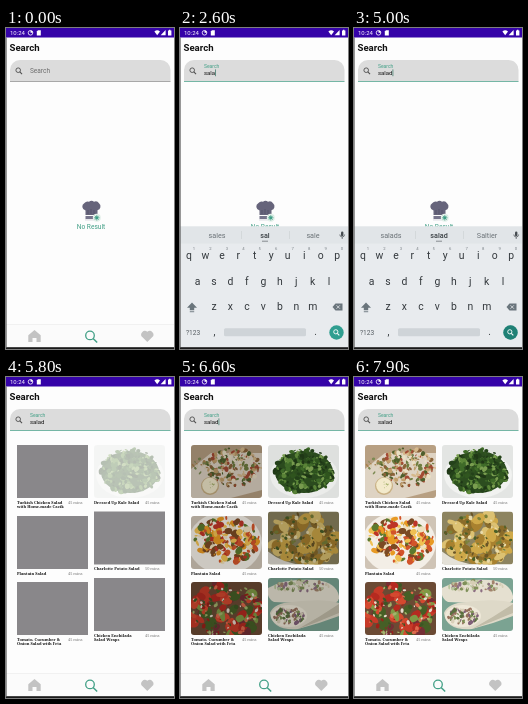
Write an HTML page that moves like this. It is 168 px wide and 321 px high and loops after 8 s.

```html
<!DOCTYPE html>
<html lang="en">
<head>
<meta charset="utf-8">
<title>Recipe search</title>
<style>
html,body{margin:0;width:100%;height:100%;overflow:hidden;background:#fdfdfd}
svg{display:block;width:100vw;height:100vh;font-family:Roboto,sans-serif}
.serif{font-family:"Noto Serif",serif}
</style>
</head>
<body>
<svg id="stage" viewBox="0 0 168 321" preserveAspectRatio="none"></svg>
<script>
const LOOP = 8000, GREEN = '#43a087';
const clamp = v => Math.max(0, Math.min(1, v));
const ramp = (t, a, b) => clamp((t - a) / (b - a));
const ease = v => v * v * (3 - 2 * v);
const mix = (a, b, v) => a + (b - a) * v;

const stage = document.getElementById('stage');
function el(parent, tag, attrs = {}, text) {
  const n = document.createElementNS('http://www.w3.org/2000/svg', tag);
  for (const k in attrs) n.setAttribute(k, attrs[k]);
  if (text !== undefined) n.textContent = text;
  parent.appendChild(n);
  return n;
}
const group = (p, a) => el(p, 'g', a);
const rect = (p, x, y, width, height, fill, a) => el(p, 'rect', {x, y, width, height, fill, ...a});
const circle = (p, cx, cy, r, fill, a) => el(p, 'circle', {cx, cy, r, fill, ...a});
const path = (p, d, fill, a) => el(p, 'path', {d, fill, ...a});
const label = (p, x, y, size, fill, s, a) => el(p, 'text', {x, y, 'font-size': size, fill, ...a}, s);
const mid = {'text-anchor': 'middle'};
const show = (n, on) => n.setAttribute('visibility', on ? 'visible' : 'hidden');
const fade = (n, v) => n.setAttribute('opacity', v);

function lens(p, x, y, r, color, w) {
  circle(p, x, y, r, 'none', {stroke: color, 'stroke-width': w});
  const k = r * .72;
  path(p, `M${x + k} ${y + k}l${r * .95} ${r * .95}`, 'none', {stroke: color, 'stroke-width': w * 1.15});
}

// page
rect(stage, 0, 0, 168, 321, '#fdfdfd');
const empty = group(stage);
path(empty, 'M79.5 187v-4.6a4 4 0 0 1-1-7.5a4 4 0 0 1 4.5-1.2a4 4 0 0 1 5 0a4 4 0 0 1 5 1.5a4 4 0 0 1-1.5 7v4.8z', '#66647b');
path(empty, 'M82 182v4M85 181v5M88 182v4', 'none', {stroke: '#4d4b62', 'stroke-width': .6});
rect(empty, 79.5, 188, 8, 3, '#77758c');
rect(empty, 79, 191.6, 9, .7, '#c5c5d0');
circle(empty, 90.8, 189.8, 4, '#e2f0e9');
circle(empty, 90.8, 189.8, 1.5, GREEN);
for (let i = 0; i < 4; i++)
  path(empty, 'M88 189.8h5.6', 'none', {stroke: GREEN, 'stroke-width': .7, transform: `rotate(${i * 45} 90.8 189.8)`});
label(empty, 85, 201, 6.6, GREEN, 'No Result', mid);

// photos drawn as loose flat shapes
let seed = 1;
const rnd = (a, b) => {
  seed = (seed * 16807) % 2147483647;
  return a + (b - a) * seed / 2147483647;
};
function bits(p, n, colors, cx, cy, rx, ry, lo, hi) {
  for (let i = 0; i < n; i++) {
    const a = rnd(0, 6.283), d = Math.sqrt(rnd(0, 1)), r = rnd(lo, hi);
    const x = cx + Math.cos(a) * d * rx, y = cy + Math.sin(a) * d * ry;
    el(p, 'ellipse', {cx: x, cy: y, rx: r, ry: r * rnd(.4, .9), fill: colors[i % colors.length],
      transform: `rotate(${rnd(0, 180)} ${x} ${y})`});
  }
}
const oval = (p, cx, cy, rx, ry, fill) => el(p, 'ellipse', {cx, cy, rx, ry, fill});
const paint = {
  chicken(p) {
    rect(p, 0, 0, 71, 53, '#b79f82');
    path(p, 'M0 24L20 8H71V45L40 53H0z', '#ded3c3');
    bits(p, 190, ['#8a6238', '#c2a06c', '#6f7d3f', '#e9dfc4', '#a34a33', '#4f5f2c', '#d6b98c'], 43, 22, 27, 19, 1, 3);
    bits(p, 14, ['#7c8a52', '#a9834f', '#d9cdb5'], 10, 20, 8, 8, 1, 2.5);
    circle(p, 19, 41, 9, '#c9b184');
    circle(p, 19, 40.6, 7.8, '#f3eacb');
    bits(p, 7, ['#a5b06b'], 19, 40, 4, 4, .5, 1.2);
  },
  kale(p) {
    rect(p, 0, 0, 71, 53, '#e3e5e3');
    oval(p, 36, 30, 34, 23, '#f1f2f0');
    oval(p, 36, 27, 29, 21, '#2c4d1f');
    bits(p, 260, ['#24421a', '#3f6b29', '#5b8638', '#30561f', '#7a9e50', '#1f3716'], 36, 26, 30, 22, 1, 3.2);
  },
  plantain(p) {
    rect(p, 0, 0, 71, 53, '#cfc4b6');
    oval(p, 34, 27, 37, 31, '#f3eee6');
    bits(p, 190, ['#e89a24', '#d2542a', '#f0c052', '#5d7a2e', '#bd3527', '#efe0bd', '#7b4a24'], 36, 24, 33, 23, 1.5, 4.2);
  },
  potato(p) {
    rect(p, 0, 0, 71, 53, '#8d8460');
    bits(p, 75, ['#a8812f', '#cfa949', '#8a6c2a', '#dcc172'], 36, 26, 34, 25, 4, 7.5);
    bits(p, 100, ['#4b5f28', '#7a8139', '#e9dbaa', '#6a5526'], 36, 26, 33, 25, .8, 2.2);
    path(p, 'M0 40Q16 53 36 53H0z', '#e4e1d8');
  },
  tomato(p) {
    rect(p, 0, 0, 71, 53, '#6b4a34');
    bits(p, 75, ['#b52a20', '#7f9a45', '#d4492f', '#465f26', '#742f35', '#c73a28'], 35, 27, 38, 28, 3.5, 7);
    bits(p, 100, ['#e6d9cb', '#3c5624', '#dd6a4c', '#9c2018', '#a3b36c'], 35, 27, 37, 27, .8, 2.6);
  },
  wraps(p) {
    rect(p, 0, 0, 71, 53, '#7ba392');
    path(p, 'M0 10Q16 0 48 2Q68 4 71 18Q72 26 60 26Q30 25 6 24Q-2 20 0 10z', '#e5e0d0');
    bits(p, 60, ['#7f9059', '#8d6f83', '#d6ceb5', '#a2836c', '#b9c59c'], 34, 8, 29, 5, 1, 2.6);
    path(p, 'M2 35Q6 25 24 24Q56 20 71 25V38Q50 46 30 51Q4 53 2 35z', '#ded9c8');
    path(p, 'M30 51Q50 44 71 35V26Q50 40 30 51z', '#c1bca8');
    oval(p, 21, 38, 18, 11, '#eee8d8');
    bits(p, 80, ['#7c8f54', '#806079', '#d9cfb9', '#96705c', '#596f3e'], 21, 38, 15, 8, 1, 2.6);
  }
};
const clip = el(el(stage, 'defs'), 'clipPath', {id: 'card'});
rect(clip, 0, 0, 71, 53, '#000', {rx: 3});

const results = group(stage);
const photos = [
  ['chicken', 11, 68, 6010, ['Turkish Chicken Salad', 'with Home-made Cacik'], 45],
  ['kale', 88, 68, 5640, ['Dressed Up Kale Salad'], 45],
  ['plantain', 11, 139, 6050, ['Plantain Salad'], 45],
  ['potato', 88, 134.5, 5950, ['Charlotte Potato Salad'], 50],
  ['tomato', 11, 205, 5940, ['Tomato, Cucumber &', 'Onion Salad with Feta'], 45],
  ['wraps', 88, 201, 6020, ['Chicken Enchilada', 'Salad Wraps'], 45]
].map(([kind, x, y, start, lines, mins], i) => {
  const card = group(results, {transform: `translate(${x} ${y})`});
  const blank = rect(card, 0, 0, 71, 53, '#89878a');
  const photo = group(card, {'clip-path': 'url(#card)'});
  seed = 77 + i * 911;
  paint[kind](photo);
  const shade = rect(photo, 0, 0, 71, 53, '#000');
  lines.forEach((s, j) => label(card, 0, 58.7 + j * 4.6, 4, '#111', s, {class: 'serif', 'font-weight': 700}));
  label(card, 51, 58.7, 3.9, '#777', mins + ' mins', {class: 'serif'});
  return {start, blank, photo, shade};
});

// header
rect(stage, 0, 0, 168, 9.5, '#3503a8');
label(stage, 4, 7, 6, '#fff', '10:24');
circle(stage, 24.5, 4.8, 2.3, 'none', {stroke: '#fff', 'stroke-width': .8});
path(stage, 'M24.5 4.8V2.5A2.3 2.3 0 0 1 26.8 4.8z', '#fff');
path(stage, 'M32 2.2h2.8v5.2h-4V3.4z', '#fff');
path(stage, 'M148.4 3.4Q151.2 1.2 154 3.4L151.2 7.2z', '#fff');
path(stage, 'M159.6 2v5.2h-5z', '#fff');
path(stage, 'M162 2.5h1v-.7h1.4v.7h1v5H162z', '#fff');
label(stage, 3.5, 22.5, 9.6, '#111', 'Search', {'font-weight': 700});

// search field
path(stage, 'M4 53.5V42a10 10 0 0 1 10-10H154.5a10 10 0 0 1 10 10V53.5z', '#dcdcdc');
const line = rect(stage, 4, 53, 160.5, .7, '#8c8c8c');
lens(stage, 12.2, 42.2, 2.3, '#4d4d4d', .9);
const hint = label(stage, 24, 45, 6.5, '#6d6d6d', 'Search');
const typed = label(stage, 24, 46.9, 6, '#111', '');
const caret = rect(stage, 0, 41.4, .7, 6.8, '#2f6f5e');

// bottom navigation
rect(stage, 0, 296.5, 168, 23, '#fbfbfb');
rect(stage, 0, 296.2, 168, .6, '#ececec');
path(stage, 'M28.5 302l6.2 5.3v6.7h-4.2v-4h-4v4h-4.2v-6.7z', '#c3c3c3');
lens(stage, 84, 307.4, 4.3, GREEN, 1.3);
path(stage, 'M141.3 314l-4.8-4.7a3.6 3.6 0 0 1 4.8-5.5a3.6 3.6 0 0 1 4.8 5.5z', '#c3c3c3');

// keyboard
const kb = group(stage);
rect(kb, 0, 198.5, 168, 121, '#e8ebee');
rect(kb, 0, 198.5, 168, 17, '#e1e5e8');
for (const x of [61, 109]) rect(kb, x, 203, .5, 8, '#c5cacd');
const words = [37, 85, 133].map((x, i) =>
  label(kb, x, 210, 7.2, i === 1 ? '#3a4044' : '#6b7277', '', {...mid, 'font-weight': i === 1 ? 500 : 400}));
const dots = group(kb);
for (let i = -1; i < 2; i++) circle(dots, 85 + i * 2, 213.2, .6, '#454b50');
rect(kb, 161, 203.5, 2.4, 4.6, '#454b50', {rx: 1.2});
path(kb, 'M159.8 206.5a2.4 2.4 0 0 0 4.8 0M162.2 209v2', 'none', {stroke: '#454b50', 'stroke-width': .7});

const keys = {};
[['qwertyuiop', 9, 230.5], ['asdfghjkl', 17.5, 256.5], ['zxcvbnm', 34, 282.3]].forEach(([row, x0, y], r) =>
  [...row].forEach((c, i) => {
    const x = x0 + i * 16.45;
    keys[c] = [x, y];
    label(kb, x, y, 10.4, '#34393d', c, mid);
    if (!r) label(kb, x + 5, 221.6, 4.2, '#7a8186', (i + 1) % 10, mid);
  }));
path(kb, 'M12 274.5l5 5.2h-2.8v2.6h-4.4v-2.6H7z', '#6a757c');
rect(kb, 9.8, 283.3, 4.4, .9, '#6a757c');
path(kb, 'M152.5 279l3-3.6h7v7.2h-7z', '#6a757c');
path(kb, 'M156.5 277.3l3.4 3.4m0-3.4l-3.4 3.4', 'none', {stroke: '#e8ebee', 'stroke-width': .8});
label(kb, 13, 306.8, 6.6, '#565d62', '?123', mid);
label(kb, 34.5, 306.8, 10, '#34393d', ',', mid);
label(kb, 135.5, 306.8, 10, '#34393d', '.', mid);
rect(kb, 44, 300.3, 82, 8, '#cfd4d8', {rx: 1.5});
circle(kb, 156.5, 304.5, 7.2, '#2f9e90');
const ripple = circle(kb, 156.5, 304.5, 7.2, '#0e5c55');
lens(kb, 155.8, 303.8, 2.1, '#fff', .9);
const pop = group(kb);
rect(pop, -8, -37, 16, 24, '#f8f9fa', {rx: 2});
const popChar = label(pop, 0, -20, 12, '#34393d', '', mid);

// device edge
rect(stage, 0, 319.2, 168, 1.8, '#1a1a1a');
rect(stage, 0, 9.5, .6, 310, '#555');

const presses = [['s', 1700], ['a', 1950], ['l', 2200], ['a', 2420], ['d', 2800]];
const guesses = [['', '', ''], ['', 's', ''], ['', 'sa', ''], ['sales', 'sal', 'sale'],
  ['sales', 'sal', 'sale'], ['salads', 'salad', 'Saltier']];

// the caret stays lit while typing and restarts its blink after the search
function caretOn(t) {
  if (t < 3500) return t >= 500;
  const since = t < 5200 ? t - 4000 : t - 5200;
  return Math.floor(since / 500) % 2 === 0;
}

function draw(t) {
  const focus = ease(ramp(t, 420, 620));
  hint.setAttribute('y', mix(45, 39.8, focus));
  hint.setAttribute('font-size', mix(6.5, 5, focus));
  hint.setAttribute('fill', focus > .5 ? GREEN : '#6d6d6d');
  line.setAttribute('fill', focus > .3 ? GREEN : '#8c8c8c');

  const done = presses.filter(p => t >= p[1]);
  const n = done.length;
  typed.textContent = done.map(p => p[0]).join('');
  caret.setAttribute('x', 24.1 + (n ? typed.getComputedTextLength() : 0));
  show(caret, caretOn(t));

  guesses[n].forEach((s, i) => words[i].textContent = s);
  const up = ease(ramp(t, 600, 900)) - ease(ramp(t, 5150, 5450));
  kb.setAttribute('transform', `translate(0 ${(1 - up) * 122})`);
  kb.setAttribute('display', up > 0 ? 'inline' : 'none');
  show(dots, n > 2);
  const last = done[n - 1];
  const held = last && t - last[1] < 150;
  show(pop, held);
  if (held) {
    pop.setAttribute('transform', `translate(${keys[last[0]]})`);
    popChar.textContent = last[0];
  }
  fade(ripple, .45 * ramp(t, 4880, 4980) * (1 - ramp(t, 5080, 5300)));

  show(empty, t < 5450);
  results.setAttribute('display', t < 5450 ? 'none' : 'inline');
  for (const p of photos) {
    const v = (t - p.start) / 1000;
    show(p.blank, v < 0);
    fade(p.photo, clamp(v * 2));
    fade(p.shade, .2 * ramp(v, .35, .6) * (1 - ramp(v, .65, 1)));
  }
}

const begin = performance.now();
function frame() {
  draw((performance.now() - begin) % LOOP);
  requestAnimationFrame(frame);
}
frame();
</script>
</body>
</html>
```
